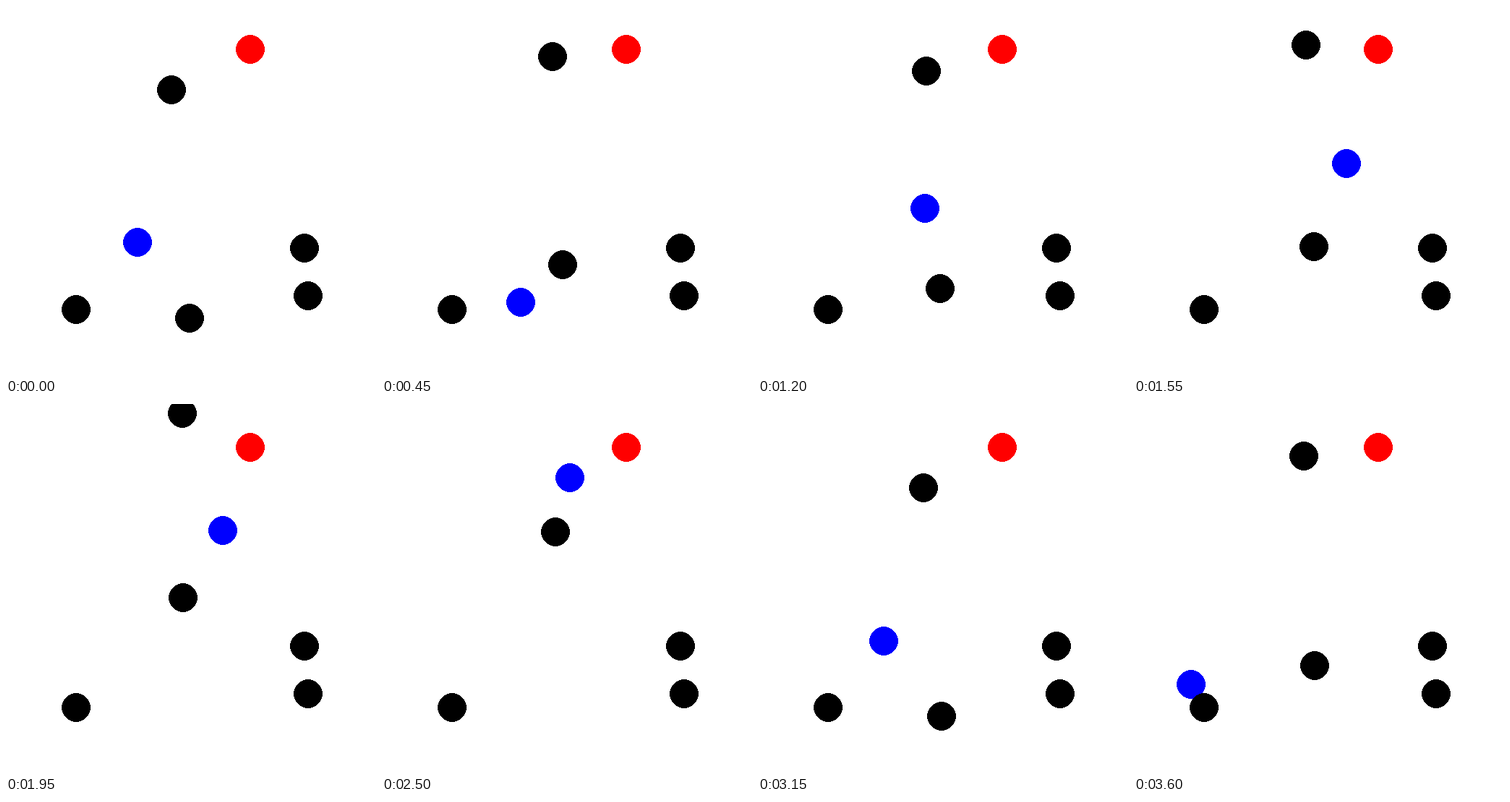
These frames come from a looping animation (512x512 px, 3.65 s). An HTML page:

```html
<!DOCTYPE html>
<html lang="en">
<head>
<meta charset="utf-8">
<title>Moving obstacles</title>
<style>
  html, body { margin: 0; width: 100%; height: 100%; overflow: hidden; background: #fff; }
  svg { display: block; width: 100vw; height: 100vh; shape-rendering: crispEdges; }
</style>
</head>
<body>
<svg viewBox="0 0 512 512">
  <defs><path id="disc"/></defs>
  <use id="agent" href="#disc" fill="#00f"/>
  <use href="#disc" x="338" y="60" fill="#f00"/>
  <use href="#disc" x="97" y="420"/>
  <use href="#disc" x="413" y="335"/>
  <use href="#disc" x="418" y="401"/>
  <use id="upper" href="#disc"/>
  <use id="lower" href="#disc"/>
</svg>
<script>
const STEP = 50, TICKS = 73, RADIUS = 20;
const byId = id => document.getElementById(id);

// Each run ends on contact, half a step into its last tick.
const point = (s, x, y) => ({ s, x, y });
const runs = [
  { start: 0, path: [point(0, 182, 327), point(5.5, 206, 376), point(11, 178, 430), point(17.5, 118, 494)] },
  { start: 19, path: [point(0, 178, 327), point(12, 294, 218), point(20, 300, 175), point(31, 260, 102), point(42.5, 304, 62)] },
  { start: 63, path: [point(0, 174, 328), point(8.5, 79, 388)] }
];

const drifters = [
  { id: "upper", x: 229, y: 116, vx: 0.73, vy: -5.15 },
  { id: "lower", x: 254, y: 432, vx: -0.45, vy: -8.22 }
];

// Hard-edged disc, one span per pixel row, by the midpoint circle rule
function discPath(r) {
  const inside = (i, j) => (Math.min(i, j) + 1) ** 2 + (Math.max(i, j) + 0.5) ** 2 < r * r;
  let d = "";
  for (let row = 0; row < r; row++) {
    let w = 0;
    while (inside(w, row)) w++;
    for (const y of [row, -row - 1]) d += `M${-w} ${y}h${2 * w}v1h${-2 * w}z`;
  }
  return d;
}

function place(id, x, y) {
  const dot = byId(id);
  dot.setAttribute("x", Math.round(x));
  dot.setAttribute("y", Math.round(y));
}

// Cubic Hermite curve through the points, tangents from neighbours
function along(path, s, axis) {
  let i = 0;
  while (i < path.length - 2 && s > path[i + 1].s) i++;
  const a = path[i], b = path[i + 1], h = b.s - a.s, u = (s - a.s) / h, v = 1 - u;
  const slope = j => {
    const p = path[Math.max(j - 1, 0)], q = path[Math.min(j + 1, path.length - 1)];
    return (q[axis] - p[axis]) / (q.s - p.s);
  };
  return v * v * (1 + 2 * u) * a[axis] + u * u * (1 + 2 * v) * b[axis] +
    h * u * v * (v * slope(i) - u * slope(i + 1));
}

function draw(now) {
  const tick = Math.floor(now / STEP) % TICKS;
  const { start, path } = runs.findLast(r => r.start <= tick);
  const s = Math.min(tick - start, path.at(-1).s);
  place("agent", along(path, s, "x"), along(path, s, "y"));
  for (const d of drifters) place(d.id, d.x + d.vx * s, d.y + d.vy * s);
}

let origin;
function loop(now) {
  origin ??= now;
  draw(Math.max(0, now - origin));
  requestAnimationFrame(loop);
}
byId("disc").setAttribute("d", discPath(RADIUS));
draw(0);
requestAnimationFrame(loop);
</script>
</body>
</html>
```
